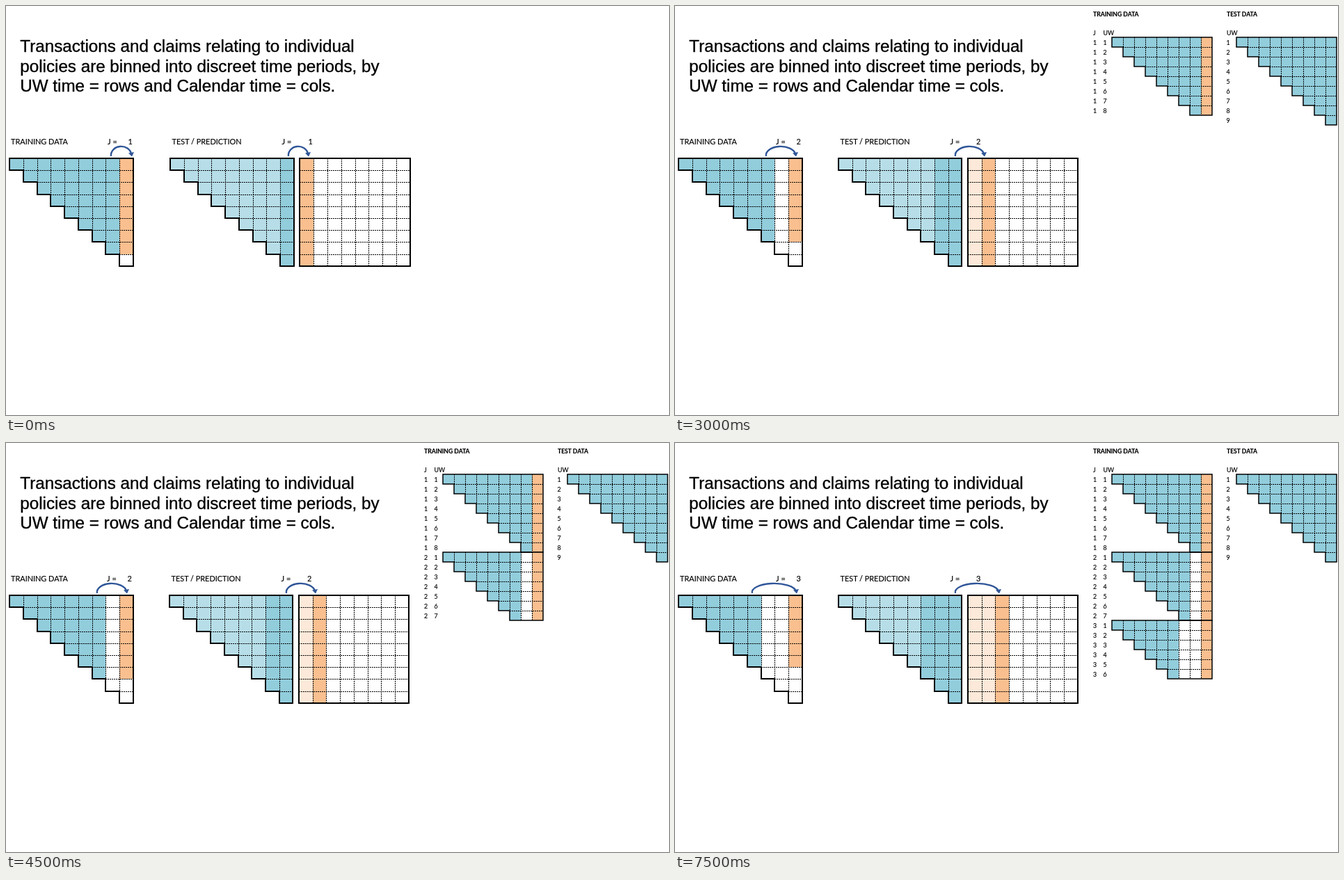
Recreate the animation shown at these times as an HTML page. Size 953 px wide and 588 px high, loop 8000 ms.

```html
<!DOCTYPE html>
<html lang="en">
<head>
<meta charset="utf-8">
<title>Training and test triangles</title>
<style>
  html, body { margin: 0; width: 100%; height: 100%; overflow: hidden; background: #fff; }
  svg { display: block; width: 953px; height: 588px; }
  text { font-family: Lato, "Open Sans", sans-serif; stroke: #000; stroke-width: .15px; }
  .intro { font: 24.2px "Liberation Sans", Arial, sans-serif; stroke-width: .35px; }
  .label { font-size: 10.9px; }
  .head { font-size: 8.6px; font-weight: 700; }
  .key { font-size: 8.8px; }
  .cells { shape-rendering: crispEdges; }
  .grid { fill: none; stroke: #000; stroke-width: 1; stroke-dasharray: 2 1; shape-rendering: crispEdges; }
  .edge { fill: none; stroke: #000; }
  .arrow { fill: none; stroke: #2f5597; stroke-width: 2.4; }
  .tip { fill: #2f5597; }
</style>
</head>
<body>
<svg id="stage" viewBox="0 0 953 588"></svg>
<script>
const LOOP = 8000, STEP = 1500;
const BLUE = '#92cddc', LIGHT = '#b7dee8', ORANGE = '#fabf8f', PALE = '#fde9d9';
const stage = document.getElementById('stage');

const text = (x, y, cls, s) => `<text x="${x}" y="${y}" class="${cls}">${s}</text>`;

// A table of cells; with stairs on, row r begins at column r.
function table({ x, y, w, h, rows, cols, line, stairs = true, fill }) {
  const X = c => Math.round(x + c * w), Y = r => Math.round(y + r * h);
  let cells = '', grid = '';
  for (let r = 0; r < rows; r++) {
    const first = stairs ? r : 0;
    for (let c = first; c < cols; c++) {
      const color = fill(r, c);
      if (color) cells += `<rect x="${X(c)}" y="${Y(r)}" width="${X(c + 1) - X(c)}" height="${Y(r + 1) - Y(r)}" fill="${color}"/>`;
    }
    if (r) grid += `M${X(first)} ${Y(r) + .5}H${X(cols)}`;
  }
  for (let c = 1; c < cols; c++) {
    grid += `M${X(c) + .5} ${Y(0)}V${Y(stairs ? Math.min(c, rows) : rows)}`;
  }
  let edge = `M${X(0)} ${Y(0)}H${X(cols)}V${Y(rows)}`;
  if (stairs) for (let r = rows - 1; r >= 0; r--) edge += `H${X(r)}V${Y(r)}`;
  else edge += `H${X(0)}`;
  return `<g class="cells">${cells}</g><path class="grid" d="${grid}"/>` +
    `<path class="edge" stroke-width="${line}" d="${edge}Z"/>`;
}

function arrow(x1, x2) {
  return `<path class="arrow" d="M${x1} 216A${(x2 - 1 - x1) / 2} 12.5 0 0 1 ${x2 - 1} 213"/>` +
    `<path class="tip" d="M${x2 - 5} 211.5L${x2 + 3} 210L${x2} 216.5Z"/>`;
}

function mainTables(j) {
  const d = j === 1 ? 0 : 1, known = 9 - j;
  const big = { y: 218.9, w: 19.72, h: 17.2, rows: 9, line: 2 };
  const [a1, a2, b1, b2] = [[151, 181, 406, 435], [131, 174, 403, 445], [111, 175, 403, 466]][j - 1];
  return text(7, 198.5, 'label', 'TRAINING DATA') +
    text(146 - d, 198.5, 'label', 'J =') + text(175.5 - d, 198.5, 'label', j) +
    text(238.5 - d, 198.5, 'label', 'TEST / PREDICTION') +
    text(396.5 - d, 198.5, 'label', 'J =') + text(434.5 - d * 1.5, 198.5, 'label', j) +
    table({ ...big, x: 5.2, cols: 9,
      fill: (r, c) => r < known && (c < known ? BLUE : c === 8 && ORANGE) }) +
    table({ ...big, x: 236.2 - d * 1.2, cols: 9, fill: (r, c) => c < known ? LIGHT : BLUE }) +
    table({ ...big, x: 422.4 - d * 1.4, w: 19.8 - d * .08, cols: 8, stairs: false,
      fill: (r, c) => c < j - 1 ? PALE : c === j - 1 && ORANGE }) +
    arrow(a1, a2) + arrow(b1, b2);
}

function stackedTables(count) {
  if (!count) return '';
  const small = { w: 16, h: 14, cols: 9, line: 1.5 };
  const rowText = (x, row, s) => text(x, 56.2 + row * small.h, 'key', s);
  let out = text(601, 15.3, 'head', 'TRAINING DATA') + text(793, 15.3, 'head', 'TEST DATA') +
    text(601, 42.2, 'key', 'J') + text(615.5, 42.2, 'key', 'UW') + text(793, 42.2, 'key', 'UW');
  let row = 0;
  for (let j = 1; j <= count; j++) {
    const rows = 9 - j;
    out += table({ ...small, x: 628, y: 45 + row * small.h, rows,
      fill: (r, c) => c < rows ? BLUE : c === 8 && ORANGE });
    for (let r = 0; r < rows; r++, row++) out += rowText(601, row, j) + rowText(615.5, row, r + 1);
  }
  for (let r = 0; r < 9; r++) out += rowText(792.5, r, r + 1);
  return out + table({ ...small, x: 807, y: 45, rows: 9, fill: () => BLUE });
}

const intro = [
  'Transactions and claims relating to individual',
  'policies are binned into discreet time periods, by',
  'UW time = rows and Calendar time = cols.'
].map((s, i) => text(20.3, 66 + i * 28.7, 'intro', s)).join('');

let shown = -1;
function draw(t) {
  const step = Math.floor((t % LOOP) / STEP);
  if (step !== shown) {
    shown = step;
    stage.innerHTML = intro + mainTables(1 + (step >> 1)) + stackedTables((step + 1) >> 1);
  }
}

const start = performance.now();
function tick() {
  draw(performance.now() - start);
  requestAnimationFrame(tick);
}
tick();
</script>
</body>
</html>
```
